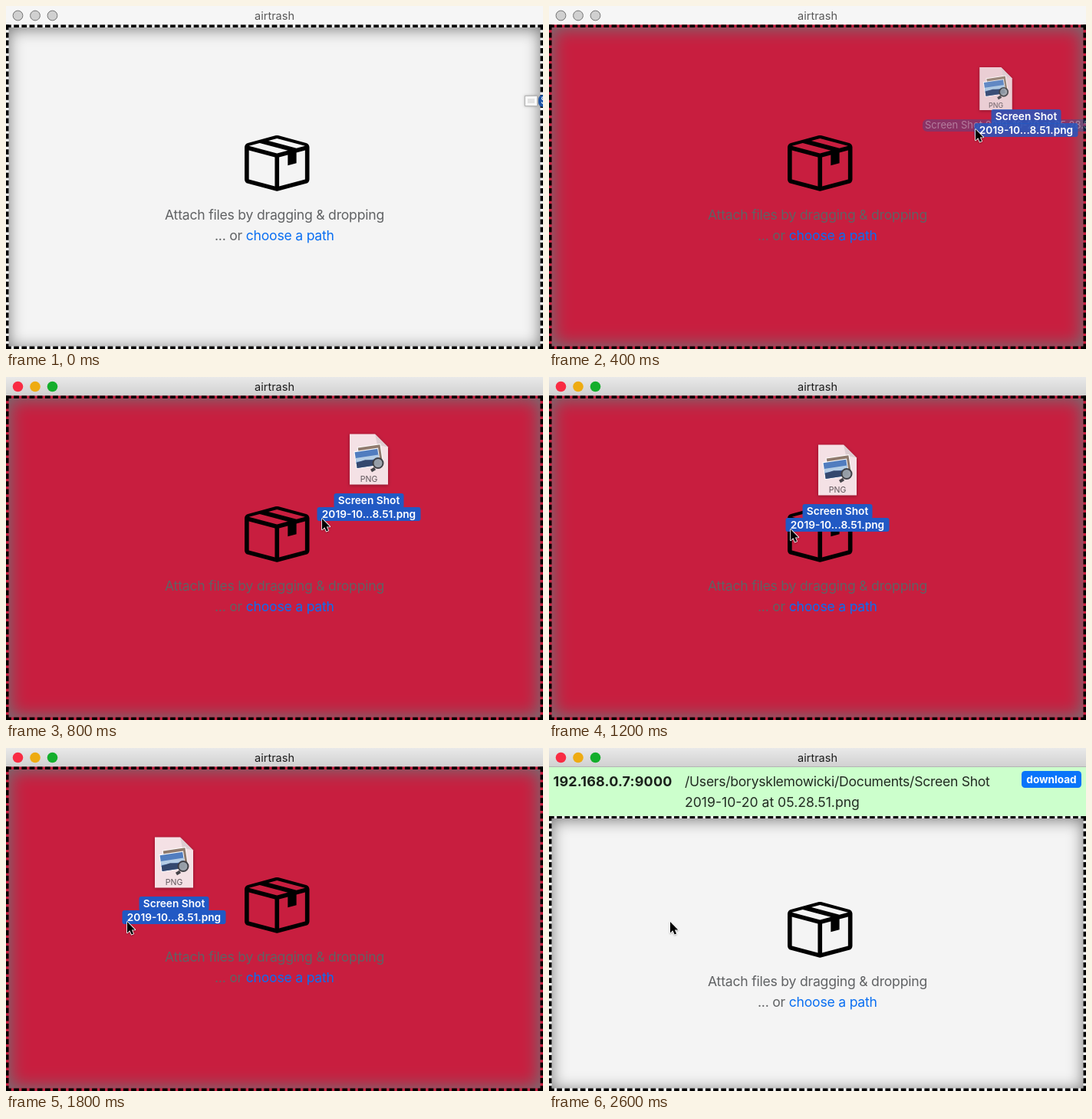
An HTML page with a canvas for the animation above (2.8 s loop, 700 by 448 pixels).

```html
<!DOCTYPE html>
<html lang="en">
<head>
<meta charset="utf-8">
<title>airtrash</title>
<style>
  html, body { margin: 0; width: 100%; height: 100%; overflow: hidden; background: #f3f3f3; }
  canvas { display: block; }
</style>
</head>
<body>
<canvas id="stage" width="700" height="448"></canvas>
<script>
const W = 700, H = 448, LOOP = 2800, STEP = 200;
const DRAG_OVER = 400, FOCUS = 600, DROP = 2000;
const BORDER = 3.5, DASH = 6.75, GAP = 3.375;
const ctx = document.getElementById('stage').getContext('2d');

const boxIcon = new Path2D('M1 4.27v7.47c0 .45.3.84.75.97l6.5 1.73c.16.05.34.05.5 0l6.5-1.73c.45-.13.75-.52.75-.97V4.27c0-.45-.3-.84-.75-.97l-6.5-1.74a1.4 1.4 0 0 0-.5 0L1.75 3.3c-.45.13-.75.52-.75.97zm7 9.09l-6-1.59V5l6 1.61v6.75zM2 4l2.5-.67L11 5.06l-2.5.67L2 4zm13 7.77l-6 1.59V6.61l2-.55V8.5l2-.53V5.53L15 5v6.77zm-2-7.24L6.5 2.8l2-.53L15 4l-2 .53z');
const arrow = new Path2D('M0 0V16L3.7 12.6L6.3 18.4L9 17.2L6.5 11.6H11.4Z');

// Pointer path: time, x, y; it comes to rest at the last point
const pointerPath = [
  [0, 763, 128], [400, 556, 160], [800, 412, 184],
  [1200, 315, 198], [1800, 158, 226]
];

function slope(i, axis) {
  if (i === pointerPath.length - 1) return 0;
  const a = pointerPath[Math.max(i - 1, 0)], b = pointerPath[i + 1];
  return (b[axis] - a[axis]) / (b[0] - a[0]);
}

// Cubic Hermite curve through the path points
function pointerAt(t) {
  const next = pointerPath.findIndex(p => p[0] > t);
  if (next < 0) {
    const [, x, y] = pointerPath.at(-1);
    return { x, y };
  }
  const a = pointerPath[next - 1], b = pointerPath[next];
  const span = b[0] - a[0], k = (t - a[0]) / span;
  const along = axis =>
    a[axis] + (b[axis] - a[axis]) * k * k * (3 - 2 * k) +
    span * k * (1 - k) * (slope(next - 1, axis) * (1 - k) - slope(next, axis) * k);
  return { x: along(1), y: along(2) };
}

function text(str, x, y, size, color, { weight = 400, align = 'left', spacing = 0 } = {}) {
  ctx.font = `${weight} ${size}px Inter, sans-serif`;
  ctx.letterSpacing = spacing + 'px';
  ctx.textAlign = align;
  ctx.fillStyle = color;
  ctx.fillText(str, x, y);
  return ctx.measureText(str).width;
}

function pill(x, y, w, h, r, color) {
  ctx.fillStyle = color;
  ctx.beginPath();
  ctx.roundRect(x, y, w, h, r);
  ctx.fill();
}

function poly(color, ...points) {
  ctx.fillStyle = color;
  ctx.beginPath();
  points.forEach(([x, y]) => ctx.lineTo(x, y));
  ctx.closePath();
  ctx.fill();
}

function titleBar(active) {
  const shade = ctx.createLinearGradient(0, 0, 0, 24);
  shade.addColorStop(0, active ? '#e9e9e9' : '#f6f6f6');
  shade.addColorStop(1, active ? '#d1d1d1' : '#f6f6f6');
  ctx.fillStyle = shade;
  ctx.fillRect(0, 0, W, 25);
  ctx.fillStyle = active ? '#b4b4b4' : '#d4d4d4';
  ctx.fillRect(0, 24, W, 1);

  const lights = active ? ['#f92b43', '#eeab12', '#14ae2c'] : Array(3).fill('#d0d0d0');
  lights.forEach((color, i) => {
    ctx.beginPath();
    ctx.arc(15.5 + i * 22.5, 12.5, active ? 6.8 : 6.4, 0, 7);
    ctx.fillStyle = color;
    ctx.fill();
    if (active) return;
    ctx.lineWidth = 1;
    ctx.strokeStyle = '#757575';
    ctx.stroke();
  });
  text('airtrash', 350, 18, 14.5, active ? '#1c1c1c' : '#585858', { align: 'center' });
}

function dashedSide(x1, y1, x2, y2) {
  const length = Math.hypot(x2 - x1, y2 - y1);
  const count = Math.round((length + GAP) / (DASH + GAP));
  ctx.setLineDash([DASH, (length - count * DASH) / (count - 1)]);
  ctx.beginPath();
  ctx.moveTo(x1, y1);
  ctx.lineTo(x2, y2);
  ctx.stroke();
}

function innerShadow(top, hot) {
  const spread = hot ? 2 : 0, inset = BORDER + spread;
  ctx.save();
  ctx.beginPath();
  ctx.rect(BORDER, top + BORDER, W - 2 * BORDER, H - top - 2 * BORDER);
  ctx.clip();
  // The casting frame lies off stage; only its shadow falls inside
  ctx.shadowColor = hot ? '#707074' : '#777';
  ctx.shadowBlur = hot ? 22 : 20;
  ctx.shadowOffsetX = 2000;
  ctx.shadowOffsetY = hot ? 0 : 2;
  ctx.beginPath();
  ctx.rect(-2100, top - 100, W + 200, H - top + 200);
  ctx.rect(-2000 + inset, top + inset, W - 2 * inset, H - top - 2 * inset);
  ctx.fill('evenodd');
  ctx.restore();
}

function dropZone(top, hot) {
  ctx.fillStyle = hot ? '#c81e3f' : '#f4f4f4';
  ctx.fillRect(0, top, W, H - top);
  innerShadow(top, hot);

  const half = BORDER / 2;
  ctx.strokeStyle = '#000';
  ctx.lineWidth = BORDER;
  dashedSide(0, top + half, W, top + half);
  dashedSide(0, H - half, W, H - half);
  dashedSide(half, top, half, H);
  dashedSide(W - half, top, W - half, H);
  ctx.setLineDash([]);

  const shift = (top - 24.5) / 2;
  ctx.save();
  ctx.translate(305.4, 160.3 + shift);
  ctx.scale(5.63, 5.63);
  ctx.fillStyle = '#000';
  ctx.fill(boxIcon, 'evenodd');
  ctx.restore();

  const style = { spacing: -0.22 };
  text('Attach files by dragging & dropping', 350, 279 + shift, 17.6, '#606264', { ...style, align: 'center' });
  const lead = text('... or ', 272, 306 + shift, 17.6, '#606264', style);
  text('choose a path', 272 + lead, 306 + shift, 17.6, '#0a6ff2', style);
}

function sharedFile() {
  ctx.fillStyle = '#ccffcc';
  ctx.fillRect(0, 25, W, 64);
  text('192.168.0.7:9000', 5.5, 50, 18, '#1b211b', { weight: 700, spacing: 0.15 });
  text('/Users/borysklemowicki/Documents/Screen Shot', 177, 50, 17.6, '#222b22', { spacing: -0.28 });
  text('2019-10-20 at 05.28.51.png', 177, 77, 17.6, '#222b22');
  pill(616, 30, 78, 22, 4.5, '#0a74fa');
  text('download', 655, 46, 13.6, '#fff', { weight: 700, align: 'center' });
}

function fileIcon(x, y, scale, alpha) {
  ctx.save();
  ctx.translate(x, y);
  ctx.scale(scale, scale);
  ctx.globalAlpha = alpha;
  ctx.shadowColor = 'rgba(0,0,0,.35)';
  ctx.shadowBlur = 4;
  ctx.shadowOffsetY = 1;
  poly('#f8e8ec', [-25, -33], [8, -33], [25, -16], [25, 33], [-25, 33]);
  ctx.shadowColor = 'transparent';
  poly('#dccbd0', [8, -33], [25, -16], [11, -19]);

  ctx.save();
  ctx.translate(0, -1);
  ctx.rotate(-0.15);
  ctx.fillStyle = '#fff';
  ctx.fillRect(-13, -17, 31, 24);
  ctx.fillStyle = '#8c7669';
  ctx.fillRect(-12, -16, 29, 22);
  ctx.fillStyle = '#fff';
  ctx.fillRect(-18, -12, 32, 23);
  ctx.fillStyle = '#4c79bd';
  ctx.fillRect(-17, -11, 30, 21);
  ctx.fillStyle = '#b9d0e6';
  ctx.fillRect(-17, -3, 30, 5);
  poly('#34466b', [-17, 3], [-5, 1], [13, 4], [13, 10], [-17, 10]);
  ctx.restore();

  ctx.strokeStyle = '#3d3d42';
  ctx.lineWidth = 4;
  ctx.beginPath();
  ctx.moveTo(8, 12);
  ctx.lineTo(3, 15);
  ctx.stroke();
  ctx.beginPath();
  ctx.arc(12, 5, 6.5, 0, 7);
  ctx.fillStyle = '#99a0a8';
  ctx.fill();
  ctx.lineWidth = 2;
  ctx.stroke();
  text('PNG', 0, 29, 10.5, '#5b5156', { align: 'center' });
  ctx.restore();
}

function fileLabel(x, y, alpha) {
  ctx.save();
  ctx.globalAlpha = alpha;
  pill(x - 45.5, y - 9, 91, 19, 3, '#2159c4');
  pill(x - 67.5, y + 9, 135, 18, 3, '#2159c4');
  ctx.globalAlpha = 1;
  const style = { weight: 600, align: 'center' };
  text('Screen Shot', x, y + 5, 13.7, '#fff', style);
  text('2019-10...8.51.png', x, y + 23, 13.7, '#fff', style);
  ctx.restore();
}

function listRow(p, alpha) {
  ctx.save();
  ctx.globalAlpha = alpha;
  pill(p.x - 69, p.y - 12, 300, 16, 6, '#1f56a8');
  text('Screen Shot 2019-10-20 at 05.28.51.png', p.x - 66, p.y, 13, '#fff');
  ctx.restore();
}

function smallIcon(p) {
  ctx.save();
  ctx.shadowColor = 'rgba(0,0,0,.3)';
  ctx.shadowBlur = 3;
  ctx.fillStyle = '#fafafa';
  ctx.fillRect(p.x - 87, p.y - 11, 17, 14);
  ctx.restore();
  ctx.lineWidth = 1;
  ctx.strokeStyle = '#b5b5b5';
  ctx.strokeRect(p.x - 86.5, p.y - 10.5, 16, 13);
  ctx.fillStyle = '#e2e2e2';
  ctx.fillRect(p.x - 83, p.y - 7, 9, 6);
}

function draggedFile(t, p) {
  if (t < DRAG_OVER) {
    listRow(p, 1);
    smallIcon(p);
  } else if (t < FOCUS) {
    listRow(p, 0.36);
    fileIcon(p.x + 26.5, p.y - 52, 0.85, 0.88);
    fileLabel(p.x + 66, p.y - 16, 0.82);
  } else {
    fileIcon(p.x + 61, p.y - 76.5, 1, 0.97);
    fileLabel(p.x + 61, p.y - 23, 1);
  }
}

function pointer({ x, y }) {
  ctx.save();
  ctx.translate(x, y + 1);
  ctx.scale(0.9, 0.9);
  ctx.lineJoin = 'round';
  ctx.lineWidth = 1.8;
  ctx.strokeStyle = '#fff';
  ctx.shadowColor = 'rgba(0,0,0,.3)';
  ctx.shadowBlur = 2;
  ctx.shadowOffsetY = 1;
  ctx.stroke(arrow);
  ctx.shadowColor = 'transparent';
  ctx.fillStyle = '#000';
  ctx.fill(arrow);
  ctx.restore();
}

function draw(now) {
  const t = Math.floor((now % LOOP) / STEP) * STEP;
  const dropped = t >= DROP, p = pointerAt(t);
  titleBar(t >= FOCUS);
  dropZone(dropped ? 88.5 : 24.5, t >= DRAG_OVER && !dropped);
  if (dropped) sharedFile();
  else draggedFile(t, p);
  pointer(p);
}

const start = performance.now();
function tick() {
  draw(performance.now() - start);
  requestAnimationFrame(tick);
}
tick();
</script>
</body>
</html>
```
